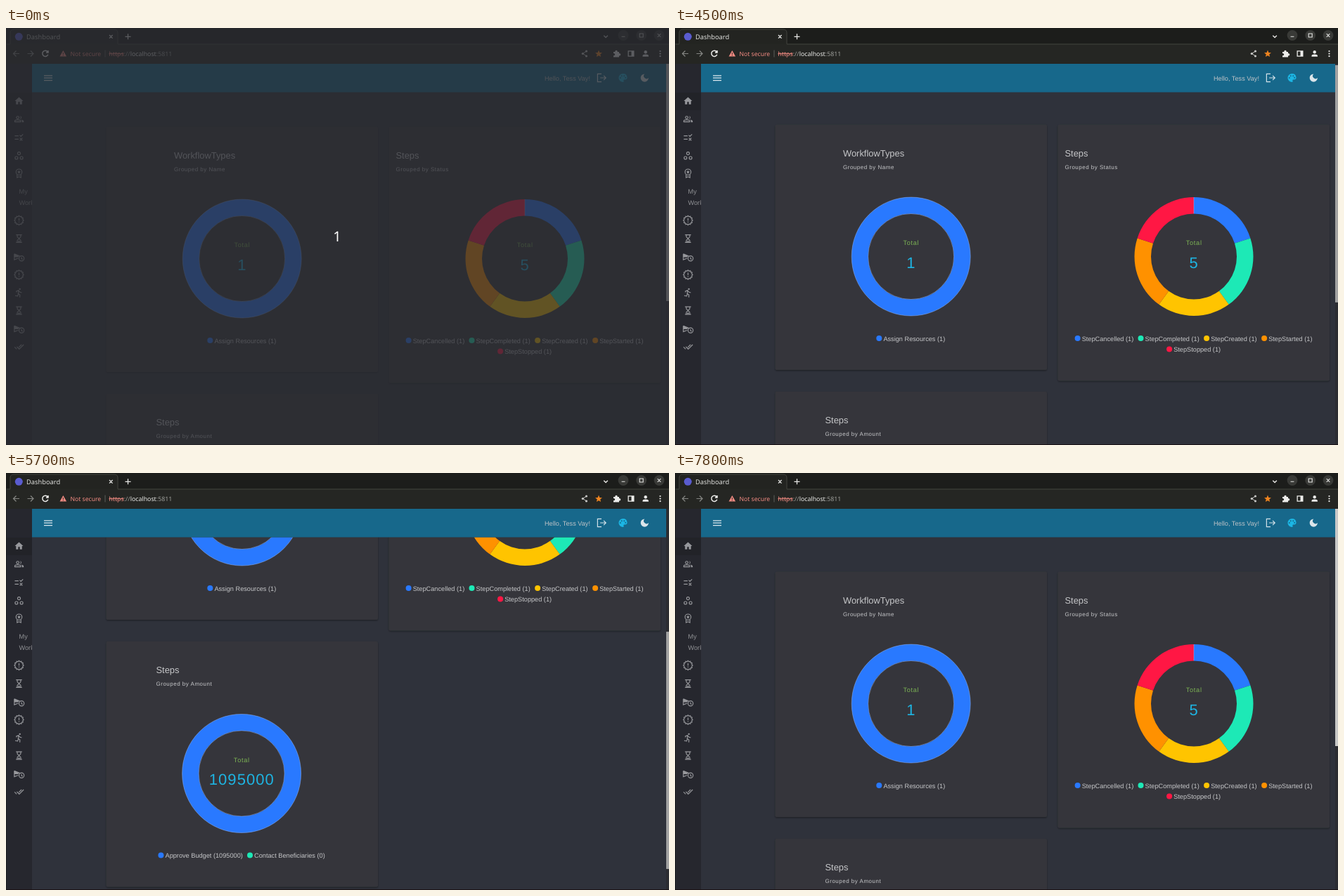
Write an HTML page that moves like this. It is 943 px wide and 594 px high and loops after 8000 ms.

```html
<!DOCTYPE html>
<html lang="en">
<head>
<meta charset="utf-8">
<title>Dashboard</title>
<style>
  html, body { margin: 0; width: 100%; height: 100%; overflow: hidden; background: #2f323b; }
  svg { display: block; width: 943px; height: 594px; }
  text { font-family: "Liberation Sans", Arial, sans-serif; font-size: 9.2px; fill: #c6c7c9; text-rendering: geometricPrecision; white-space: pre; }
  .ui text { font-family: "Noto Sans", "Open Sans", sans-serif; }
  .title { font-size: 12.9px; }
  .sub { font-size: 8px; letter-spacing: .5px; }
  .total { fill: #7cb354; letter-spacing: .7px; text-anchor: middle; }
  .num { font-size: 22px; fill: #1eb4e2; letter-spacing: 1.05px; text-anchor: middle; }
</style>
</head>
<body>
<svg id="stage" viewBox="0 0 943 594" xmlns="http://www.w3.org/2000/svg">
  <defs>
    <clipPath id="view"><rect x="37" y="91.5" width="902" height="501.5"/></clipPath>
    <clipPath id="rail"><rect x="0" y="51" width="37" height="542"/></clipPath>
    <filter id="shade" x="-5%" y="-5%" width="110%" height="112%">
      <feDropShadow dx="0" dy="1.2" stdDeviation="1" flood-color="#000" flood-opacity=".4"/>
    </filter>
  </defs>
  <rect width="943" height="594" fill="#2f323b"/>
  <g clip-path="url(#view)"><g id="page"></g></g>

  <g id="side" clip-path="url(#rail)">
    <rect y="51" width="37" height="543" fill="#26272e"/>
    <rect y="92" width="37" height="25" fill="#222328"/>
    <text x="18.5" y="236" fill-opacity=".65">My</text>
    <text x="18.5" y="252" fill-opacity=".65">Workflows</text>
  </g>

  <g id="bar">
    <rect x="37" y="51" width="902" height="40.5" fill="#17688b"/>
    <path d="M54 67.8h12M54 71.2h12M54 74.6h12" stroke="#dbe8ee" stroke-width="1.3"/>
    <text x="831" y="74.5" text-anchor="end" fill-opacity=".95">Hello, Tess Vay!</text>
  </g>

  <rect x="939" y="51" width="4" height="543" fill="#2b2c31"/>
  <rect id="thumb" x="939" y="51" width="4" height="338"/>

  <g class="ui" id="chrome">
    <rect width="943" height="51" fill="#1c1d1b"/>
    <rect y="23" width="943" height="28" fill="#252623"/>
    <path d="M0 23H6V7q0-5 5-5H154q5 0 5 5V23H943" fill="#232421" stroke="#43443f" stroke-width="1"/>
    <path d="M6.5 23.2H158.5" stroke="#252623" stroke-width="1.6"/>
    <circle cx="18.3" cy="12.3" r="5.5" fill="#5a5ccf"/>
    <path d="M147 10l4.6 4.6m0-4.6l-4.6 4.6M169.5 12.3h8M173.5 8.3v8" stroke="#e6e6e4" stroke-width="1.3"/>
    <g id="frame">
      <text x="29" y="15.8" style="font-size:9.3px;fill:#dededc">Dashboard</text>
      <path d="M850.3 10.8l2.8 2.8 2.8-2.8" fill="none" stroke="#e6e6e4" stroke-width="1.4"/>
      <g fill="#393a37"><circle cx="878" cy="10.5" r="7.4"/><circle cx="903.7" cy="10.5" r="7.4"/><circle cx="929" cy="10.5" r="7.4"/></g>
      <path d="M875.6 12.3h4.8M901.2 8h5v5h-5zM926.7 8.2l4.6 4.6m0-4.6l-4.6 4.6" fill="none" stroke="#e6e6e4" stroke-width="1.1"/>
    </g>
    <g fill="none" stroke-width="1.2">
      <path d="M19 36.5h-8.5m4-4l-4 4 4 4M30.5 36.5H39m-4-4l4 4-4 4" stroke="#858683"/>
      <path d="M59.3 34a4.1 4.1 0 1 0 .5 3.8M60 32v3h-3" stroke="#eeeeec" stroke-width="1.5"/>
      <path d="M141 31.5v10" stroke="#5d5e5a" stroke-width="1"/>
      <path d="M825.5 33l-5 3.5 5 3.5" stroke="#c8c8c6" stroke-width="1"/>
    </g>
    <path d="M81.3 32l4.8 8.6h-9.6z" fill="#f28b82"/>
    <path d="M81.3 35v2.6m0 .8v1.1" stroke="#252623"/>
    <text x="91.5" y="39.8" style="font-size:8.6px;fill:#f28b82">Not secure</text>
    <text x="146.3" y="39.8" style="font-size:8.8px;fill:#9d9e9a"><tspan fill="#f28b82" text-decoration="line-through">https</tspan>://<tspan fill="#ececea">localhost</tspan>:5811</text>
    <g fill="#c8c8c6"><circle cx="825.5" cy="33" r="1.6"/><circle cx="820.3" cy="36.5" r="1.6"/><circle cx="825.5" cy="40" r="1.6"/></g>
    <path id="star" fill="#ee8420"/>
    <g fill="#eeeeec">
      <path d="M864 34h2.4a1.7 1.7 0 1 1 3.2 0h2.4v2.2a1.7 1.7 0 1 1 0 3.2v2h-8v-2.2a1.6 1.6 0 1 0 0-3z"/>
      <path d="M884.5 32.3h9v8.4h-9zm1.3 1.3v5.8h3.7v-5.8z" fill-rule="evenodd"/>
      <circle cx="909.7" cy="34.3" r="2.2"/><path d="M905.5 40.8v-1.2q0-2.2 4.2-2.2t4.2 2.2v1.2z"/>
      <circle cx="930.5" cy="33" r="1.1"/><circle cx="930.5" cy="36.6" r="1.1"/><circle cx="930.5" cy="40.2" r="1.1"/>
    </g>
  </g>
  <path d="M0 593.5H943" stroke="#1a1114"/>
  <path d="M.3 0V594" stroke="#17181a" stroke-width=".8"/>

  <g id="count">
    <rect width="943" height="594" fill="#2b2c31" fill-opacity=".74"/>
    <text x="471" y="304" text-anchor="middle" style="font:20px 'Noto Sans',sans-serif;fill:#fff">1</text>
  </g>
</svg>
<script>
const $ = id => document.getElementById(id);

function add(parent, tag, attrs, text) {
  const el = document.createElementNS("http://www.w3.org/2000/svg", tag);
  for (const k in attrs) el.setAttribute(k, attrs[k]);
  if (text) el.textContent = text;
  parent.append(el);
  return el;
}

// --- cards ---
const BLUE = "#2979ff", GREEN = "#1de9b6";
const COLORS = [BLUE, GREEN, "#ffc400", "#ff9100", "#ff1744"];
const R = 84.5, HOLE = 61;

function slice(cx, cy, from, to) {
  const at = (r, turn) => {
    const a = turn * 2 * Math.PI;
    return `${cx + r * Math.sin(a)} ${cy - r * Math.cos(a)}`;
  };
  return `M${at(R, from)}A${R} ${R} 0 0 1 ${at(R, to)}L${at(HOLE, to)}A${HOLE} ${HOLE} 0 0 0 ${at(HOLE, from)}Z`;
}

function card(o) {
  const g = add($("page"), "g", { transform: `translate(0 ${o.y})` });
  add(g, "rect", { x: o.x, y: 0, width: 386.5, height: o.h, rx: 2, fill: "#35363a", filter: "url(#shade)" });
  add(g, "text", { x: o.tx, y: 45.3, class: "title" }, o.title);
  add(g, "text", { x: o.tx, y: 63.3, class: "sub" }, o.sub);
  const cy = 188, edge = { stroke: "#a9c6ff", "stroke-opacity": .6, "stroke-width": .7 };
  const parts = [];
  if (o.parts === 1) {
    add(g, "circle", { cx: o.cx, cy, r: (R + HOLE) / 2, fill: "none", stroke: BLUE, "stroke-width": R - HOLE });
    for (const r of [R, HOLE]) add(g, "circle", { cx: o.cx, cy, r, fill: "none", ...edge });
  } else {
    for (let i = 0; i < o.parts; i++)
      parts.push(add(g, "path", { d: slice(o.cx, cy, i / o.parts, (i + 1) / o.parts), fill: COLORS[i] }));
    add(g, "path", { d: `M${o.cx} ${cy - R}V${cy - HOLE}`, ...edge });
  }
  add(g, "text", { x: o.cx + .2, y: cy - 16.3, class: "total" }, "Total");
  add(g, "text", { x: o.cx + .2, y: cy + 16, class: "num" }, o.total);
  o.legend.forEach(([x, label, row = 0], i) => {
    const y = 304.4 + row * 15.5;
    add(g, "circle", { cx: x, cy: y, r: 4, fill: COLORS[i] });
    add(g, "text", { x: x + 6.1, y: y + 3.6 }, label);
  });
  return parts;
}

card({ x: 142.5, y: 140.5, h: 349.5, tx: 239, cx: 335.7, parts: 1, title: "WorkflowTypes",
  sub: "Grouped by Name", total: "1", legend: [[290.3, "Assign Resources (1)"]] });
const parts = card({ x: 544.5, y: 140.5, h: 365, tx: 554.5, cx: 738, parts: 5, title: "Steps",
  sub: "Grouped by Status", total: "5", legend: [[572.6, "StepCancelled (1)"], [662.5, "StepCompleted (1)"],
    [756.1, "StepCreated (1)"], [838.1, "StepStarted (1)"], [703.1, "StepStopped (1)", 1]] });
card({ x: 142.5, y: 521, h: 349.5, tx: 213.5, cx: 335.1, parts: 1, title: "Steps",
  sub: "Grouped by Amount", total: "1095000", legend: [[220.4, "Approve Budget (1095000)"], [347, "Contact Beneficiaries (0)"]] });

// --- icons on a 24-unit grid: [stroked path, filled path] ---
const dot = (x, y, r) => `M${x - r} ${y}a${r} ${r} 0 1 0 ${2 * r} 0a${r} ${r} 0 1 0 ${-2 * r} 0z`;
function rosette(r, n) {
  let d = "";
  for (let i = 0; i < n * 2; i++) {
    const a = i * Math.PI / n, q = i % 2 ? r - 2 : r;
    d += (i ? "L" : "M") + (12 + q * Math.sin(a)).toFixed(2) + " " + (12 - q * Math.cos(a)).toFixed(2);
  }
  return d + "z";
}
function star(cx, cy, r) {
  let d = "";
  for (let i = 0; i < 10; i++) {
    const a = i * Math.PI / 5, q = i % 2 ? r * .45 : r;
    d += (i ? "L" : "M") + (cx + q * Math.sin(a)) + " " + (cy - q * Math.cos(a));
  }
  return d + "z";
}
$("star").setAttribute("d", star(843, 36.8, 5.2));

const ICONS = {
  home: ["", "M10 20v-6h4v6h5v-8h3L12 3 2 12h3v8z"],
  people: [dot(9, 8, 3) + "M2 18v-1.5q0-3 7-3t7 3V18z", "M15 4.3a4 4 0 0 1 0 7.5q2.5-4 0-7.5zM17 13q6 1 6 4v2h-4v-2q0-2.500-2-4z"],
  rule: ["M2 8h9M2 16h9M13.500 6.500l3 3 5-5M14 13l6 6m0-6l-6 6", ""],
  spaces: [dot(12, 6.5, 3.3) + dot(6, 17, 3.3) + dot(18, 17, 3.3), ""],
  badge: [dot(12, 9, 7) + "M7.500 15v7l4.500-2 4.500 2v-7", star(12, 9, 4.5)],
  alert: [rosette(11, 12) + "M12 7v6M12 15v2", ""],
  glass: ["M5 3h14M5 21h14M8 3v5l4 4 4-4V3M8 21v-5l4-4 4 4v5", "M9 20l3-4 3 4z"],
  send: ["M1 4l13 5.500M1 4v14l9-3.500M1 11h9" + dot(18, 15, 6) + "M18 12v3.500l2.500 1.500", "M1 4l12 5-3 2H1z"],
  run: ["M6 11V8.500l5-2 2.500 4 5 1.500M11.500 7l-1.500 7 4 3v6M10.500 14l-1.500 6-6-1", dot(14, 3.5, 2)],
  done: ["M1.500 12.500l5 5M7 12l5.500 5.500L23 7M11.500 13.500L18 7", ""],
  exit: ["M12 3H3v18h9M9 12h13m-5-5l5 5-5 5", ""],
  moon: ["", "M12 2a10 10 0 1 0 10 10 6.500 6.500 0 1 1-10-10z"],
  palette: ["", "M12 2a10 10 0 0 0 0 20q2 0 2-2 0-1-.600-1.500Q13 16 15 16h2a5 5 0 0 0 5-5Q21 2 12 2z"
    + dot(6, 12, 1.6) + dot(9, 7.5, 1.6) + dot(15, 7.5, 1.6) + dot(18, 11.5, 1.6)]
};
function icon(parent, name, x, y, size, color) {
  const s = size / 24, [line, fill] = ICONS[name];
  const g = add(parent, "g", { transform: `translate(${x - size / 2} ${y - size / 2}) scale(${s})` });
  if (line) add(g, "path", { d: line, fill: "none", stroke: color, "stroke-width": 1.9 });
  if (fill) add(g, "path", { d: fill, fill: color, "fill-rule": "evenodd" });
}
[["home", 104], ["people", 130], ["rule", 156], ["spaces", 182], ["badge", 207], ["alert", 274], ["glass", 300],
 ["send", 326.5], ["alert", 351.5], ["run", 377], ["glass", 402.5], ["send", 429], ["done", 454]]
  .forEach(([name, y]) => icon($("side"), name, 18.5, y, 14.5, "#97989c"));
icon($("bar"), "exit", 847, 71, 15, "#d5e3ea");
icon($("bar"), "palette", 877.5, 71, 14.5, "#1cb6e4");
icon($("bar"), "moon", 908.3, 71, 13.5, "#dbe5ea");

// --- timeline: [ms, value] ---
const LOOP = 8000, STEP = 100, RATIO = 1.605;
const SCROLL = [[4400, 0], [4500, 3], [4600, 30], [4900, 153], [5100, 197], [5400, 244], [5700, 281], [6000, 329],
  [6500, 329], [6600, 322], [6700, 302.5], [6900, 218], [7200, 82], [7400, 19], [7500, 0]];
const HOVER_BLUE = [[0, BLUE], [1800, "#2e86fb"], [1900, "#328ff8"], [2200, "#3391f6"], [2500, BLUE]];
const HOVER_GREEN = [[0, GREEN], [2500, "#38efc2"], [2900, GREEN]];
const THUMB = [[0, "#c8c8c8"], [3700, "#a2a2a2"], [7800, "#c8c8c8"]];

const held = (rows, t) => rows.filter(r => r[0] <= t).pop()[1];
function blend(rows, t) {
  const i = rows.findIndex(r => r[0] > t);
  if (i === 0) return rows[0][1];
  if (i < 0) return rows[rows.length - 1][1];
  const [a, b] = [rows[i - 1], rows[i]];
  return a[1] + (b[1] - a[1]) * (t - a[0]) / (b[0] - a[0]);
}

function draw(time) {
  const t = Math.floor(time % LOOP / STEP) * STEP;
  const y = blend(SCROLL, t);
  $("page").setAttribute("transform", `translate(0 ${-y})`);
  $("thumb").setAttribute("y", 51 + y / RATIO);
  $("thumb").setAttribute("fill", held(THUMB, t));
  parts[0].setAttribute("fill", held(HOVER_BLUE, t));
  parts[1].setAttribute("fill", held(HOVER_GREEN, t));
  $("count").setAttribute("visibility", t < 100 ? "visible" : "hidden");
  $("frame").setAttribute("opacity", t < 1300 ? .8 : 1);
}

const start = performance.now();
function tick() {
  draw(performance.now() - start);
  requestAnimationFrame(tick);
}
tick();
</script>
</body>
</html>
```
